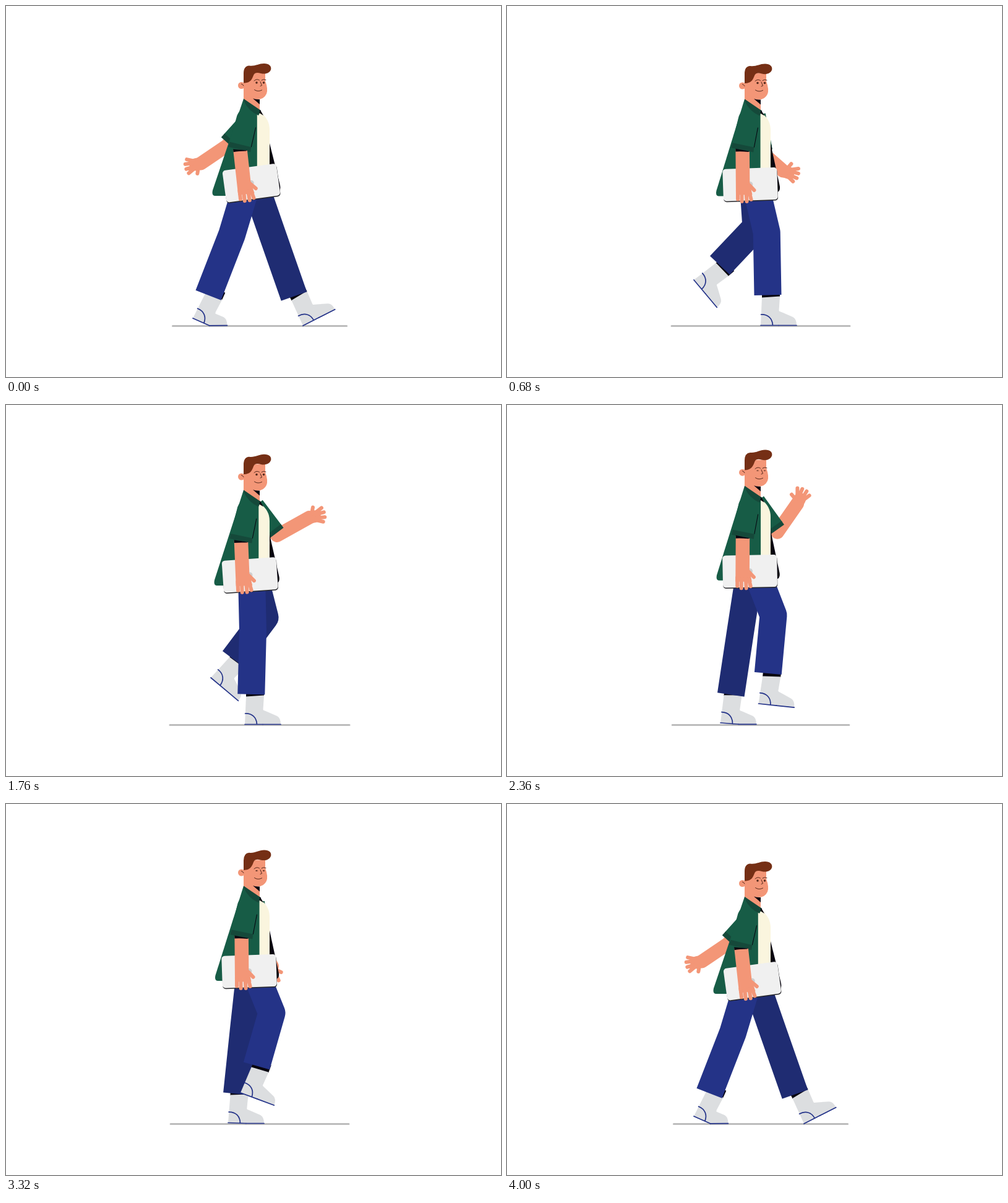
An HTML page that plays this animation: 800x600 px, repeating every 4040 ms.

```html
<!DOCTYPE html>
<html lang="en">
<head>
<meta charset="utf-8">
<title>Walk cycle</title>
<style>
  html, body { margin: 0; width: 100%; height: 100%; overflow: hidden; background: #fff; }
  svg { display: block; width: 800px; height: 600px; }
  .skin { fill: #f39677; }
  .limb { fill: none; stroke: #f39677; stroke-linecap: round; stroke-linejoin: round; }
  .green { fill: #175c46; }
  .cuff { fill: #15493a; }
  .dark { fill: #07040f; }
  .boot { fill: #dcdee0; }
  .trim { fill: none; stroke: #243389; stroke-width: 1.7; stroke-linecap: round; }
  .leg { fill: none; stroke-width: 44; stroke-linejoin: round; }
  .face { fill: none; stroke: #55291d; stroke-width: 1; stroke-linecap: round; }
</style>
</head>
<body>
<svg viewBox="0 0 800 600">
  <defs>
    <g id="heel">
      <path class="dark" d="M2-59H31V-46L2-44Z"/>
      <path class="boot" d="M2-45L31-47L29.5-24L33-12L29 0H0Z"/>
    </g>
    <path id="toe" class="boot" d="M27-25Q30-22.500 36-20.500L52-13.500Q58-10.500 58 0H29Z"/>
  </defs>

  <line id="ground" y1="517.500" y2="517.500" stroke="#bdbdbd" stroke-width="3" stroke-linecap="round"/>

  <g id="farArm">
    <path id="arm" class="limb" stroke-width="22"/>
    <g id="hand" class="limb" stroke-width="6">
      <path d="M0 0H9" stroke-width="20"/>
      <path d="M5-5L9-15M10-5L22.500-11.500M12-3L25-4M12 3L25 4M10 6L21 11"/>
    </g>
    <path id="sleeve" stroke="#175c46" stroke-width="32"/>
    <path id="sleeveEnd" stroke="#15493a" stroke-width="32"/>
  </g>

  <g id="farLeg"></g>
  <g id="nearLeg"></g>

  <g id="body">
    <path id="flap" class="dark"/>
    <path d="M404 172H411Q426 183 426 200V300H400Z" fill="#faf5de"/>
    <ellipse class="skin" cx="380.500" cy="128.500" rx="5.500" ry="5.500"/>
    <path class="skin" d="M384 108H419V121Q424 135 421 142Q417 151 406 151L410 158V170H405L384 151Z"/>
    <path class="dark" d="M399 149.500Q404 151.500 410 151V159Z"/>
    <path class="face" d="M380.500 126Q383 126.500 384 129"/>
    <path id="hair" fill="#752f15" d="M384 124.500V109Q384 97 393 96.500C402 98 408 93 417 93C425 93 429 97 428.300 102C427 108 420 111 412 109Q403 106 400.500 111C397.500 118 396 124.500 384 124.500Z"/>
    <g id="features">
      <path class="face" d="M401 121Q405 117 409.500 120M413 120Q416 117.500 420 119.500M411 122.500L413.500 128.500L411 129.500M401.500 135.500Q407 139.500 413.500 136"/>
      <g id="eyes" fill="#55291d"><circle cx="405" r="1.700"/><circle cx="416.500" r="1.700"/></g>
    </g>
    <path id="shirt" class="green"/>
    <path class="cuff" d="M384 150L412 169L408 177Q392 170 384 153Z"/>
    <path class="dark" d="M410.500 167.500L416 177L409.500 173Z"/>
    <g id="nearSleeve">
      <path class="green" d="M383 166Q375 174 374 182L363 229L399 236L406 190Z"/>
      <path class="cuff" d="M365 221L400 228L399 236L363 229Z"/>
      <path d="M406 196L400 228" stroke="#07040f" fill="none"/>
    </g>
  </g>

  <g id="carry">
    <g transform="rotate(-1.500 392.700 288)">
      <rect x="349" y="263.500" width="88" height="52" rx="5" fill="#26262a"/>
      <rect x="348.700" y="262" width="88" height="52" rx="5" fill="#f0f0f0"/>
    </g>
    <circle cx="392.500" cy="288" r="4.500" fill="#cfcfcf"/>
    <path class="skin" d="M369.500 231L392 235V286L396 305H369.500Z"/>
    <path class="limb" stroke-width="6" d="M372.500 298V312M379 300V315.500M386 300L387 315.500M391 300L394 312.500M391 289L399 297.500"/>
    <path class="dark" d="M369.500 230.200L392 234.700L390 235.500Q378 234.500 369.500 235Z"/>
  </g>
</svg>

<script>
const LOOP = 4040, STEP = 40, CYCLE = 24;
const $ = id => document.getElementById(id);
const set = (el, attrs) => { for (const k in attrs) el.setAttribute(k, attrs[k]); };

// Smooth periodic curve through rows of [time, ...values], without overshoot.
function track(rows, period) {
  const n = rows.length;
  const at = (i, c) => rows[(i + n) % n][c] + (c ? 0 : period * Math.floor(i / n));
  const slope = (i, c) => (at(i + 1, c) - at(i, c)) / (at(i + 1, 0) - at(i, 0));
  const tangent = (i, c) => {
    const a = slope(i - 1, c), b = slope(i, c);
    return a * b > 0 ? 2 * a * b / (a + b) : 0;
  };
  return time => {
    const t = time % period;
    let i = n - 1;
    while (rows[i][0] > t) i--;
    const h = at(i + 1, 0) - rows[i][0], u = (t - rows[i][0]) / h, v = 1 - u;
    return rows[i].slice(1).map((p, j) => {
      const c = j + 1;
      return p * (1 + 2 * u) * v * v + at(i + 1, c) * u * u * (3 - 2 * u)
        + h * u * v * (tangent(i, c) * v - tangent(i + 1, c) * u);
    });
  };
}

const bob = track([[0, 0], [3, 6], [4, 0.5], [6, -12.5], [8, -17.5], [9, -19.3]], CYCLE / 2);

// time, hip x, knee x y, hem x y, heel x y, foot angle, toe bend
const stride = track([
  [0, 403, 430.7, 370, 465.5, 469.5, 480, 517, -27, 0],
  [3, 404.5, 426, 369, 431, 469.7, 425, 517.5, -3.5, 0],
  [4, 402, 419.7, 366, 421.5, 467.5, 410, 516.5, 0, 0],
  [6, 397, 399, 365, 396.3, 467.8, 386, 516.5, 0, 0],
  [8, 394, 384, 364, 373, 468.7, 359, 515.5, 2, 2],
  [9, 392, 377.5, 364.7, 361.8, 468.5, 345, 514, 4.5, 4.5],
  [12, 389, 365, 370, 327, 467.8, 302, 505, 24, 24.5],
  [15, 396, 395.8, 364, 335.5, 428.5, 289.5, 450, 55, 0],
  [16, 398, 402.5, 357.5, 344, 419.3, 302, 443, 50, 0],
  [18, 401.7, 418.5, 343.4, 367.6, 411.3, 331, 441, 40, 0],
  [20, 403, 429.5, 338, 405, 423.5, 379, 467, 20.5, 0],
  [21, 403.7, 430.5, 340, 421.8, 434, 406.5, 483, 6, 0]
], CYCLE);

// time, elbow x y, wrist x y, hand angle
const swing = [
  [0, 357, 226, 315, 254.5, 168],
  [3, 376, 230, 346, 264, 128],
  [8, 408, 240, 430, 280, 92],
  [12, 422, 234, 468, 246, 5],
  [16, 414, 238, 446, 266, 19],
  [20, 392, 240, 385, 280, 90]
];
const wave = [
  [36, 430, 228, 480, 222, -5],
  [42, 438, 223.5, 490, 194.5, -11],
  [47, 437, 225, 469, 179, -62],
  [52, 438, 224, 488, 193, -15],
  [57, 437, 225, 469, 179, -62],
  [62, 437, 225, 486, 200, -8],
  [67, 414, 238, 436, 274, 60]
];
const cycleAt = (start, count) => swing.slice(0, count).map(([t, ...pose]) => [t + start, ...pose]);
const armPose = track([...cycleAt(0, 6), ...cycleAt(24, 3), ...wave, ...cycleAt(72, 6)], 4 * CYCLE);

function makeLeg(id, color) {
  const root = $(id);
  root.innerHTML = `<g>
      <use href="#heel"/><g><use href="#toe"/><path class="trim" d="M29 0H58"/></g>
      <path class="trim" d="M0 0H29M.5-17.500C12-18 19-11 19.500 0"/>
    </g><path class="leg" stroke="${color}"/>`;
  const [foot, trousers] = root.children, toe = foot.children[1];
  return (phase, dy) => {
    const [hip, kx, ky, hx, hy, fx, fy, angle, bend] = stride(phase);
    set(trousers, { d: `M${hip} ${290 + dy}L${kx} ${ky}L${hx} ${hy}` });
    set(foot, { transform: `translate(${fx} ${fy}) rotate(${angle})` });
    set(toe, { transform: `rotate(${-bend} 29 0)` });
  };
}
const farLeg = makeLeg('farLeg', '#1f2c72');
const nearLeg = makeLeg('nearLeg', '#243387');

function drawFarArm(n) {
  const sx = 402, sy = 176;
  const [ex, ey, wx, wy, angle] = armPose(n);
  const along = f => `${sx + (ex - sx) * f} ${sy + (ey - sy) * f}`;
  set($('arm'), { d: `M${sx} ${sy}L${ex} ${ey}L${wx} ${wy}` });
  set($('hand'), { transform: `translate(${wx} ${wy}) rotate(${angle})` });
  set($('sleeve'), { d: `M${along(0)}L${along(0.85)}` });
  set($('sleeveEnd'), { d: `M${along(0.82)}L${along(0.94)}` });
}

function drawBody(s, dy) {
  const left = 337 - 3 * s, front = 408.3 - 2.5 * s, right = 441 + 1.5 * s, hem = 307 + 0.2 * dy;
  const drop = `translate(0 ${dy})`;
  set($('body'), { transform: drop });
  set($('farArm'), { transform: drop });
  set($('shirt'), { d: `M384 150L${left} ${hem - 9}Q${left - 2} ${hem} ${left + 4} ${hem}H360L${front} 300V174L409 169Z` });
  set($('flap'), { d: `M426 222L${right} 288Q${right + 3} 300 ${right - 5} 301H424V222Z` });
  set($('hair'), { transform: `translate(384 0) skewY(${dy * 0.1}) translate(-384 0)` });
  set($('features'), { transform: `translate(0 ${-dy * 0.08})` });
  set($('eyes'), { transform: `translate(0 124) scale(1 ${Math.min(1, 1 + (dy + 13) * 0.1)})` });
  set($('nearSleeve'), { transform: `translate(${-0.8 - 0.8 * s} 0) rotate(${1 + 1.4 * s} 394 178)` });
  set($('carry'), { transform: `translate(${-0.7 - 1.3 * s} ${dy}) rotate(${-2.4 - 3.9 * s} 380 235)` });
}

function draw(now) {
  const n = Math.round(Math.floor(now % LOOP / STEP) * 0.96);
  const dy = bob(n)[0];
  const reach = 142 - 1.5 + 4.5 * Math.sin(Math.PI * n / 12) ** 2;
  set($('ground'), { x1: 410 - reach, x2: 410 + reach });
  farLeg(n, dy);
  nearLeg(n + CYCLE / 2, dy);
  drawFarArm(n);
  drawBody(Math.cos(2 * Math.PI * n / CYCLE), dy);
}

function tick() {
  draw(performance.now());
  requestAnimationFrame(tick);
}
tick();
</script>
</body>
</html>
```
